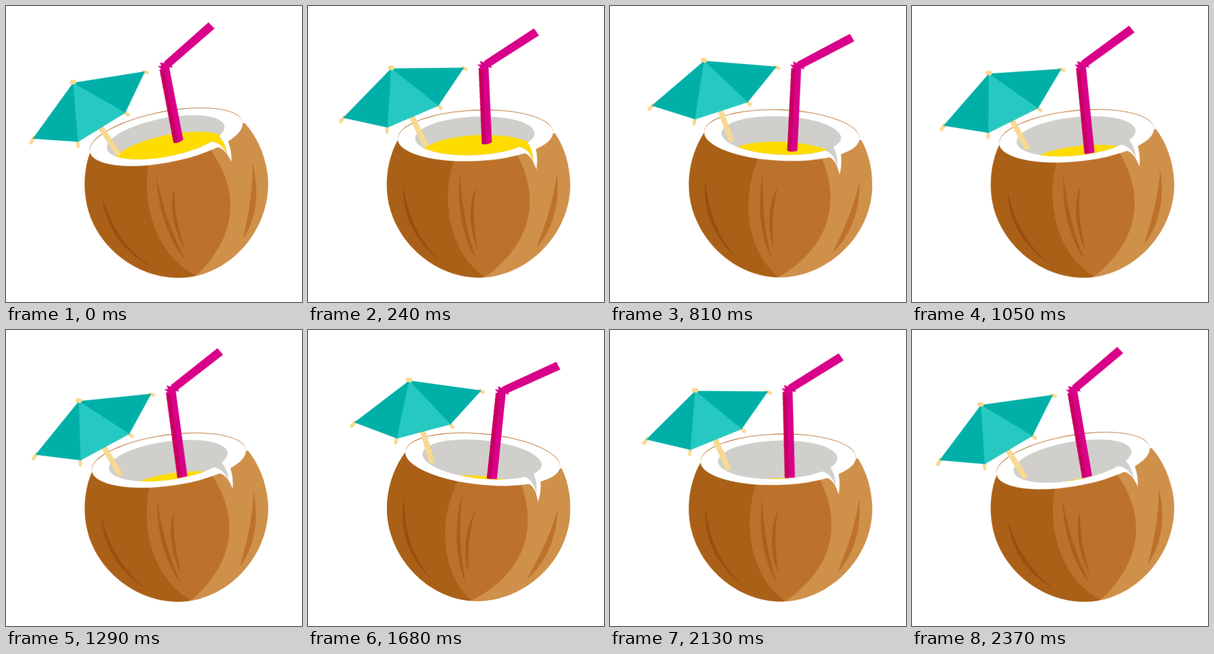
Recreate the animation shown at these times as an HTML page. Size 480x480 px, loop 2.4 s.

```html
<!DOCTYPE html>
<html lang="en">
<head>
<meta charset="utf-8">
<title>Coconut drink</title>
<style>
  html, body { margin: 0; width: 100%; height: 100%; overflow: hidden; background: #fff; }
  svg { display: block; width: 100%; height: 100%; }

  .rock { transform-origin: 280.5px 290.5px; animation: rock 600ms linear infinite alternate; }
  .sink { animation: sink 2400ms cubic-bezier(.37, .17, .45, 1) infinite; }
  .drip { animation: drip 2400ms linear infinite; }

  @keyframes rock { from { transform: rotate(-16.8deg); } to { transform: rotate(4.2deg); } }
  @keyframes sink { from { transform: translateY(0); } to { transform: translateY(33.5px); } }
  @keyframes drip {
    0%, 19% { transform: translateY(0); }
    32%, 100% { transform: translate(6px, 45px); }
  }

  .dark { fill: #aa6017; }
  .mid { fill: #bd722b; }
  .light { fill: #cf904a; }
  .groove { fill: #9a4f0f; }
  .white { fill: #fff; }
  .inside { fill: #d0cfcc; }
  .juice { fill: #fedc00; }
  .pink { fill: #d9008a; }
  .shade { fill: #c8005f; }
  .teal { fill: #00b0a8; }
  .mint { fill: #26c9c1; }
  .wood { fill: none; stroke: #f8d992; stroke-linecap: round; }
</style>
</head>
<body>
<svg viewBox="0 0 480 480">
  <defs>
    <path id="shell" transform="translate(276.5 290.3) rotate(6.3)"
      d="M-127-80C-141.500-57-148.700-28-148.700 0C-148.700 79-79 149.500 0 149.500S148.700 79 148.700 0C148.700-28 141.500-57 127-80Z"/>
    <ellipse id="hole" rx="97" ry="31.2" transform="translate(282.2 210) rotate(5.7)"/>
    <path id="lip" d="M340 236L348 237C359 240 367 248 370 265C372 250 369 238 364 231L352 226Z"/>
    <clipPath id="inShell"><use href="#shell"/></clipPath>
    <clipPath id="inHole"><use href="#hole"/></clipPath>
    <clipPath id="inLip"><use href="#lip"/></clipPath>
    <clipPath id="overRim">
      <path d="M0-100H600V219.500H378.700A97 31.2 5.7 0 1 185.700 200.400H0Z"/>
    </clipPath>
    <clipPath id="overJuice">
      <path class="sink" d="M200-100H500V222H308Q300 226 291 222H200Z"/>
    </clipPath>
  </defs>

  <g class="rock">
    <!-- shell -->
    <g clip-path="url(#inShell)">
      <use href="#shell" class="mid"/>
      <path class="dark" d="M245 240C213 300 211 388 265 439L230 470H90V170H245Z"/>
      <path class="light" d="M341 238C370 306 365 387 265 439L300 470H460V170H341Z"/>
      <path class="groove" d="M155.500 274C147 324 163 368 199 404C170 367 157 330 155.500 274Z"/>
      <path class="dark" d="M249.500 267C237 316 238 370 255.500 409C246 362 245 318 249.500 267Z"/>
      <path class="dark" d="M272.500 291C255 319 251 357 259.500 393C259 354 262 321 272.500 291Z"/>
      <path class="mid" d="M405 290C403 338 386 378 355 404C373 371 392 337 405 290Z"/>
    </g>

    <!-- rim and opening -->
    <ellipse rx="126" ry="41" transform="translate(283.2 208.9) rotate(5.7)" fill="#b87030"/>
    <ellipse class="white" rx="126" ry="41" transform="translate(283.2 210) rotate(5.7)"/>
    <path class="white" d="M346 249C361 244 370 258 373 278.500C377 267 378 255 377 243L388 225L350 225Z"/>
    <use href="#hole" class="inside"/>
    <use href="#lip" class="inside"/>

    <!-- juice -->
    <g clip-path="url(#inLip)"><use href="#lip" class="juice drip"/></g>
    <g clip-path="url(#inHole)">
      <g class="sink"><use href="#hole" class="juice" y="28"/></g>
    </g>

    <!-- straw -->
    <g clip-path="url(#overRim)">
      <g clip-path="url(#overJuice)">
        <path class="pink" d="M304.500 102L320.500 103L305.500 250H289Z"/>
        <path class="shade" d="M304.500 102L311 102L296 250H289Z"/>
      </g>
    </g>
    <path class="pink" d="M315 92L402.500 51.500L409 64L322 103Z"/>
    <path class="pink" d="M303 96L309 97L308 91L314 94L318 91L323 97L326 105L320 103L317 107L313 104L304 106L307 101Z"/>

    <!-- parasol -->
    <path class="wood" stroke-width="9" d="M184 158L200.500 212"/>
    <g class="wood" stroke-width="5.500">
      <path d="M77 149L70.500 155.500M144 174L142 183M230 152L234.500 157.500M278 98L284 101"/>
    </g>
    <path class="teal" d="M164 82L75 150L144 176L231 153L281 98Z"/>
    <path class="mint" d="M164 82L144 176L231 153Z"/>
    <path class="wood" stroke-width="7.500" d="M162.500 80.500L165.500 81.500"/>
  </g>
</svg>
</body>
</html>
```
